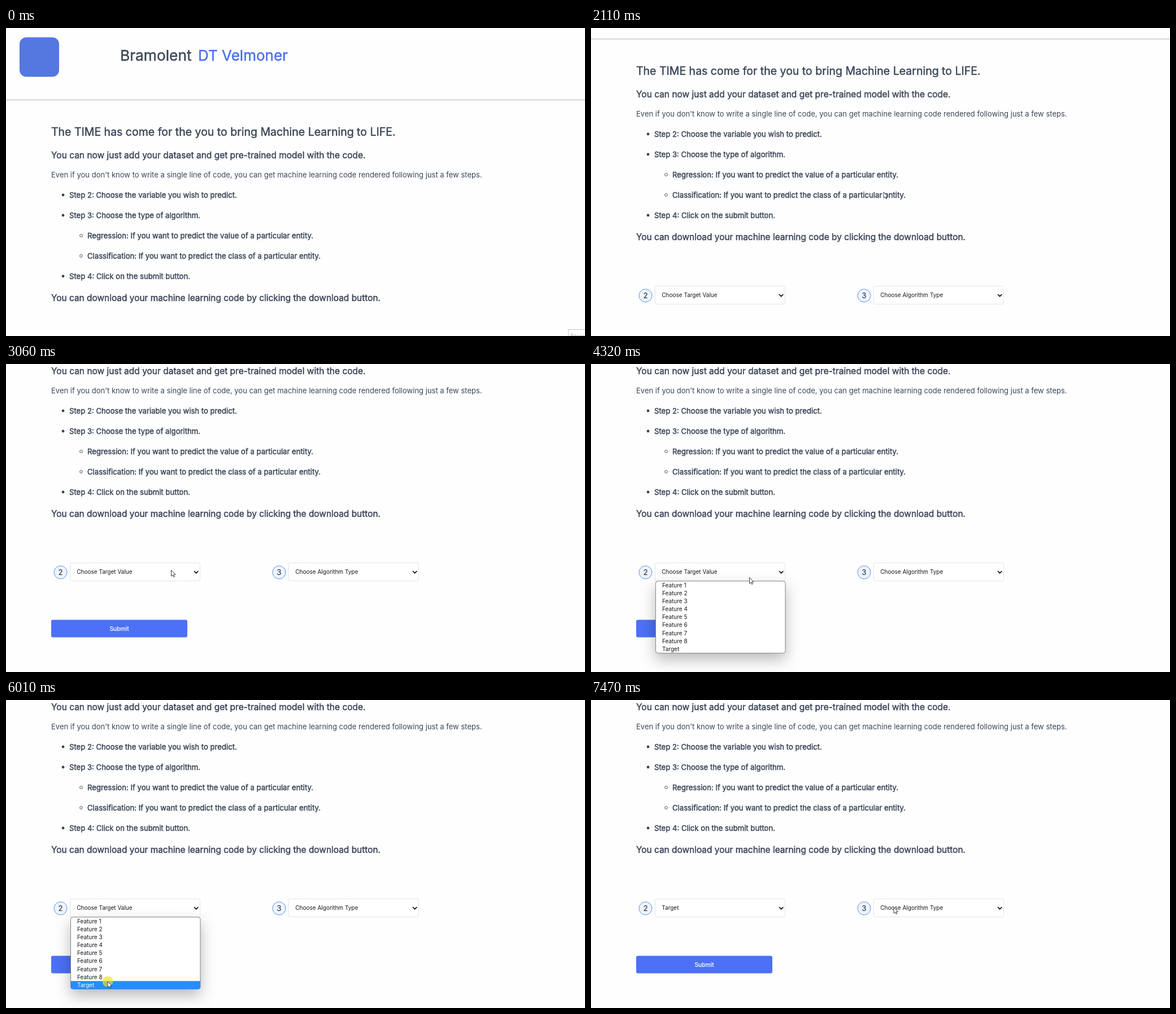
An HTML page that plays this animation: 1025x546 px, repeating every 8000 ms.

```html
<!DOCTYPE html>
<html lang="en">
<head>
<meta charset="utf-8">
<title>Model builder</title>
<style>
  html, body { margin: 0; width: 100%; height: 100%; overflow: hidden; background: #fefefe; }
  svg { display: block; width: 1025px; height: 546px; }
  text { font-family: Inter, sans-serif; font-optical-sizing: none; fill: #3a4657; white-space: pre; }
  .bold { stroke: #3a4657; stroke-width: .45px; }
  .ui { font-size: 10px; fill: #14181f; }
  #menu { filter: drop-shadow(0 11px 13px rgba(0, 0, 0, .27)); }
</style>
</head>
<body>
<svg viewBox="0 0 1025 546">
  <g id="page"></g>
  <g id="menu"></g>
  <circle id="click" r="9.5" fill="#f2e21c" opacity=".68"/>
  <path id="cursor" d="M.5 .5V11.2L3 8.9 4.7 12.6 6.3 11.9 4.7 8.3H8Z" fill="#fff" stroke="#222b3a" stroke-width=".9"/>
  <g id="tip">
    <rect x="995.5" y="534.5" width="60" height="30" fill="#fff" stroke="#c4c4c4"/>
    <text x="999" y="549" font-size="9" style="fill:#aaa">Recording</text>
  </g>
</svg>
<script>
const LOOP = 8000, ROW_TOP = 385.4, ROW = 14.1;
const $ = id => document.getElementById(id);
const show = (id, on) => $(id).setAttribute('visibility', on ? 'visible' : 'hidden');
const move = (id, x, y) => $(id).setAttribute('transform', `translate(${x} ${y})`);

const text = (x, y, size, str, attrs = 'class="bold"') =>
  `<text x="${x}" y="${y}" font-size="${size}" ${attrs}>${str}</text>`;
const disc = (y, str) =>
  `<circle cx="101" cy="${y - 5}" r="2.4" fill="#3a4657"/>` + text(112, y, 13.14, str);
const ring = (y, str) =>
  `<circle cx="133" cy="${y - 5}" r="2.4" fill="none" stroke="#3a4657" stroke-width=".9"/>` + text(144, y, 13.14, str);
const select = (x, num, id, label) => `
  <circle cx="${x - 16.5}" cy="582.4" r="11.5" fill="#eef4fd" stroke="#5b92ea"/>
  ${text(x - 16.5, 587.2, 13.4, num, 'text-anchor="middle" style="fill:#1c2430"')}
  <rect x="${x + .5}" y="565.5" width="230" height="32" rx="2.5" fill="#fff" stroke="#e2e5ea"/>
  <text id="${id}" class="ui" x="${x + 12.3}" y="585.2">${label}</text>
  <path d="M${x + 220} 580l3.7 3.7 3.7-3.7" fill="none" stroke="#111" stroke-width="1.7"/>`;

$('page').innerHTML = `
  <rect x="24" y="16.5" width="70" height="70" rx="12" fill="#5478de"/>
  ${text(202, 58, 26.3, 'Bramolent')}
  ${text(340, 58, 26, 'DT Velmoner', 'style="fill:#4a6cf4;stroke:#4a6cf4;stroke-width:.45px"')}
  <path d="M0 127.5H1025" stroke="#b2b2b2"/>
  ${text(80, 190.8, 19.5, 'The TIME has come for the you to bring Machine Learning to LIFE.')}
  ${text(80, 230.7, 15.5, 'You can now just add your dataset and get pre-trained model with the code.')}
  ${text(80, 264.8, 13.03, "Even if you don't know to write a single line of code, you can get machine learning code rendered following just a few steps.", '')}
  ${disc(301, 'Step 2: Choose the variable you wish to predict.')}
  ${disc(337, 'Step 3: Choose the type of algorithm.')}
  ${ring(373, 'Regression: If you want to predict the value of a particular entity.')}
  ${ring(409, 'Classification: If you want to predict the class of a particular entity.')}
  ${disc(445, 'Step 4: Click on the submit button.')}
  ${text(80, 483.5, 15.43, 'You can download your machine learning code by clicking the download button.')}
  ${select(113, 2, 'target', 'Choose Target Value')}
  ${select(500, 3, 'algorithm', 'Choose Algorithm Type')}
  <rect id="submit" x="80" y="666.5" width="241" height="31" rx="3"/>
  ${text(200.5, 685.6, 10.4, 'Submit', 'text-anchor="middle" style="fill:#fff;stroke:#fff;stroke-width:.25px"')}`;

const options = [1, 2, 3, 4, 5, 6, 7, 8].map(n => 'Feature ' + n).concat('Target');
$('menu').innerHTML = `
  <clipPath id="inside"><rect x="114.5" y="385" width="229.5" height="127.5" rx="4"/></clipPath>
  <rect x="114.5" y="384.8" width="229.5" height="127.7" rx="4" fill="#fff" stroke="#858585"/>
  <rect id="mark" x="114.5" width="229.5" height="${ROW}" fill="#1e90ff" clip-path="url(#inside)"/>
  ${options.map((o, i) => `<text class="ui option" x="126" y="${ROW_TOP + i * ROW + 10.5}">${o}</text>`).join('')}`;
const optionTexts = document.querySelectorAll('.option');

// Each run: first step time, last step time, step count, first point, last point.
const cursorRuns = [
  [260, 1030, 11, [985, 540], [898, 432]],
  [1100, 1310, 4, [780, 393], [516.5, 290]],
  [1570, 1700, 2, [516, 289.5], [517.5, 290.5]],
  [2650, 3060, 6, [495, 298], [292, 365]],
  [4320, 4600, 5, [280, 378], [200, 460.5]],
  [4670, 5020, 6, [197, 467], [179.5, 498.5]],
  [6560, 7120, 9, [188, 494], [470, 349]],
  [7190, 7330, 3, [482, 348], [504.5, 354]],
  [7400, 7470, 2, [520, 361], [535.5, 367]],
];
const scrollRuns = [[1970, 2180, 4, [10], [157]], [2250, 2320, 2, [213], [213]]];

function stepped(runs, t, rest) {
  const run = runs.filter(r => t >= r[0]).pop();
  if (!run) return rest;
  const [start, end, n, from, to] = run;
  const k = Math.min(n - 1, Math.floor((t - start) / (end - start) * (n - 1) + 1e-6));
  return from.map((v, i) => v + (to[i] - v) * k / (n - 1));
}

function draw(t) {
  const [x, y] = stepped(cursorRuns, t, [985, 540]);
  const [scroll] = stepped(scrollRuns, t, [0]);
  const open = t >= 3660 && t < 6080;
  const picked = open && t >= 4320 ? Math.floor((y - ROW_TOP) / ROW) : -1;
  const hover = t >= 6560 && x > 80 && x < 321 && y > 453 && y < 484;

  move('page', 0, -scroll);
  move('cursor', x, y);
  move('click', x + .5, y + .5);
  show('tip', t < 70);
  show('cursor', t >= 260);
  show('click', t >= 3590 && t < 3790 || t >= 6010 && t < 6170);
  $('menu').style.display = open ? '' : 'none';
  $('mark').setAttribute('y', ROW_TOP + picked * ROW);
  $('mark').style.display = picked < 0 ? 'none' : '';
  optionTexts.forEach((o, i) => o.style.fill = i === picked ? '#fff' : '');
  $('target').textContent = t < 6080 ? 'Choose Target Value' : 'Target';
  $('submit').setAttribute('fill', hover ? '#3f5fe0' : '#4c70f6');
}

const begin = performance.now();
function frame() {
  draw((performance.now() - begin) % LOOP);
  requestAnimationFrame(frame);
}
frame();
</script>
</body>
</html>
```
